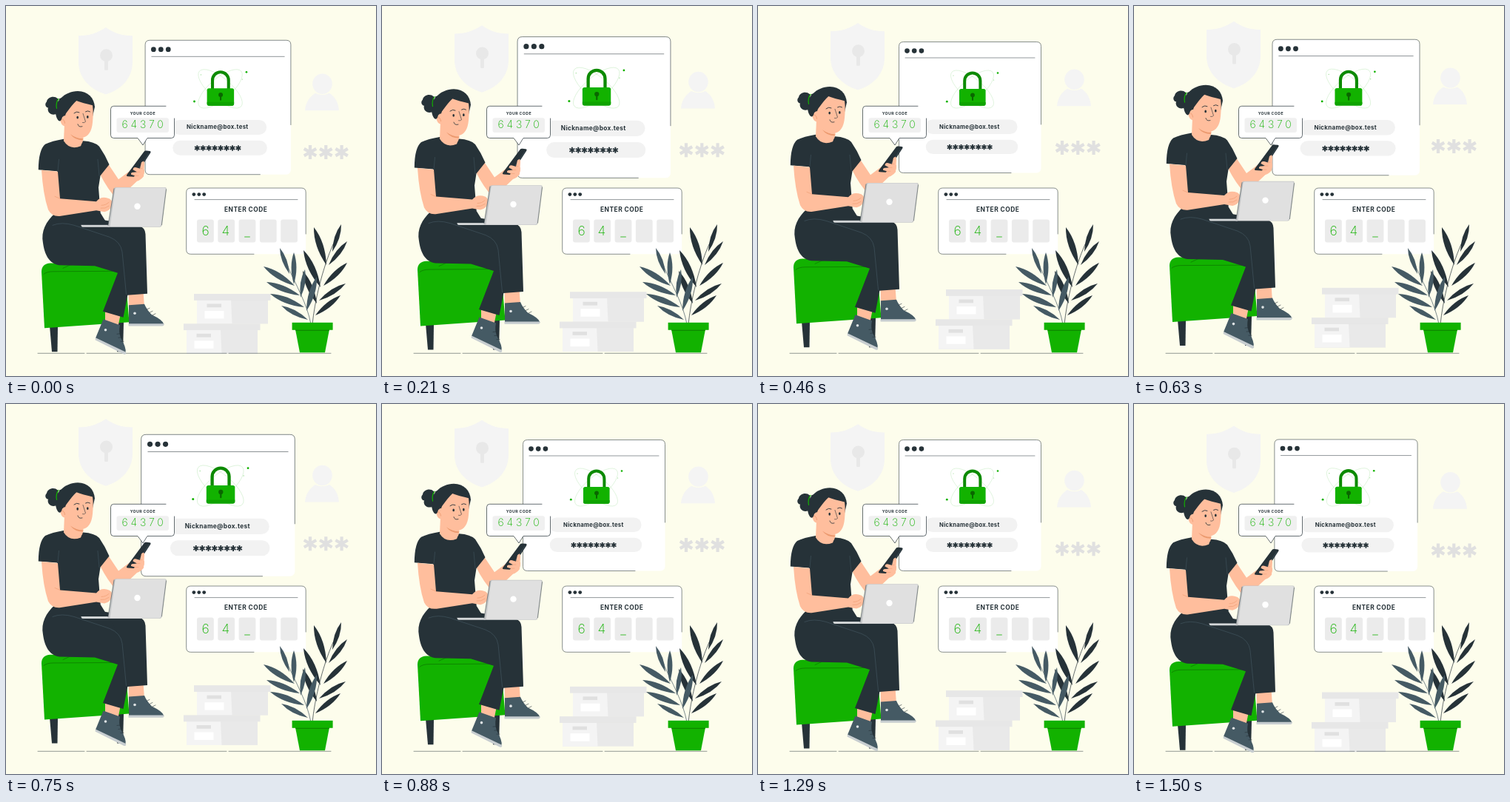
An HTML page for the animation above (1540 ms loop, 500 px wide and 500 px high).

```html
<!DOCTYPE html>
<html lang="en">
<head>
<meta charset="utf-8">
<title>Two-step sign in</title>
<style>
html, body { margin: 0; width: 100%; height: 100%; overflow: hidden; background: #fdfdec; }
svg { display: block; width: 100vw; height: 100vh; }
text { font-family: Inter, "Open Sans", sans-serif; text-anchor: middle; }
</style>
</head>
<body>
<svg id="stage" viewBox="0 0 500 500"></svg>
<script>
const LOOP = 1540, LEAD = 53, LIFT = 10;
const INK = '#263238', SLATE = '#455a64', GREEN = '#12b200', DEEP = '#0c8a00';
const SKIN = '#ffbe9d', SHADE = '#eb996e';

const path = (d, fill) => `<path d="${d}" fill="${fill}"/>`;
const line = (d, color, w = 1) =>
  `<path d="${d}" fill="none" stroke="${color}" stroke-width="${w}" stroke-linecap="round" stroke-linejoin="round"/>`;
const rect = (x, y, w, h, fill, r = 0) =>
  `<rect x="${x}" y="${y}" width="${w}" height="${h}" rx="${r}" fill="${fill}"/>`;
const dot = (x, y, r, fill, ry = r) => `<ellipse cx="${x}" cy="${y}" rx="${r}" ry="${ry}" fill="${fill}"/>`;
const label = (x, y, size, weight, fill, str, gap = 0) =>
  `<text x="${x}" y="${y}" font-size="${size}" font-weight="${weight}" fill="${fill}" letter-spacing="${gap}">${str}</text>`;
const group = (id, ...parts) => `<g id="${id}">${parts.join('')}</g>`;
const repeat = (n, fn) => Array.from({ length: n }, (_, i) => fn(i)).join('');

// Six-armed asterisk
function star(x, y, r, w, color) {
  const d = repeat(3, i => {
    const a = Math.PI / 2 + i * Math.PI / 3, c = r * Math.cos(a), s = r * Math.sin(a);
    return `M${x - c} ${y - s}L${x + c} ${y + s}`;
  });
  return `<path d="${d}" stroke="${color}" stroke-width="${w}"/>`;
}

// White panel whose outline is left open at the lower right corner
function panel(x, y, w, h, r, endX, endY) {
  const R = x + w, B = y + h;
  return rect(x, y, w, h, '#fff', r) + line(
    `M${endX} ${B}H${x + r}Q${x} ${B} ${x} ${B - r}V${y + r}Q${x} ${y} ${x + r} ${y}` +
    `H${R - r}Q${R} ${y} ${R} ${y + r}V${endY}`, INK, 0.55);
}

function leaf(x0, y0, x1, y1, color, w = 0.16) {
  const mx = x0 * 0.45 + x1 * 0.55, my = y0 * 0.45 + y1 * 0.55;
  const nx = (y1 - y0) * w, ny = (x0 - x1) * w;
  return path(`M${x0} ${y0}Q${mx + nx} ${my + ny} ${x1} ${y1}Q${mx - nx} ${my - ny} ${x0} ${y0}Z`, color);
}

function shield() {
  return path('M135 29.7C124 37 112 41 98 41V76C98 98 113 113 135 120.3C157 113 171 98 171 76V41C157 41 145 37 135 29.7Z', '#f4f4f4') +
    dot(135.5, 67.5, 8.5, '#e8e8e8') + rect(133, 72, 5, 15.5, '#e8e8e8', 1.5);
}

function account() {
  return dot(427.5, 106, 13.3, '#f4f4f4', 13.7) +
    path('M404 142C405 130 411 123 418 118.5Q427.5 123 437 118.5C444 123 449 130 450 142Z', '#f4f4f4');
}

function box(x, y) {
  return rect(x + 4, y + 8, 96, 32.5, '#e9e9e9') +
    path(`M${x + 4} ${y + 8}h46l1.5 32.5h-47.5Z`, '#f4f4f4') +
    rect(x, y, 103.5, 8.8, '#e7e7e7') +
    rect(x + 17.5, y + 13.5, 19.5, 4.8, '#e0e0e0') + rect(x + 14.5, y + 23, 26, 10.5, '#fff');
}

function lock() {
  const orbit = a =>
    `<ellipse cx="289.5" cy="112.5" rx="36" ry="14" transform="rotate(${a} 289.5 112.5)" fill="none" stroke="#b7e6b2" stroke-width=".4"/>`;
  return orbit(40) + orbit(-40) +
    line('M279.2 114V101A10.6 10.6 0 0 1 300.4 101V114', DEEP, 4) +
    rect(272, 112, 35.6, 22.7, GREEN, 2.5) +
    path('M272 130V132Q272 134.7 274.5 134.7H305Q307.6 134.7 307.6 132V130Z', '#0fa300') +
    dot(290, 120.3, 2.9, '#0a6600') + rect(289, 121, 2, 7, '#0a6600', 1) +
    dot(324, 90.5, 1.3, GREEN) + dot(255.3, 129.2, 1.4, GREEN) +
    dot(318.5, 100, 0.6, '#8fd988') + dot(264, 94, 0.6, '#8fd988');
}

function login() {
  return panel(190.5, 48.5, 192, 177, 6, 342, 160) +
    repeat(3, i => dot(201.5 + i * 9.7, 60.6, 3.3, INK)) +
    line('M199 70H374', INK, 0.5) + lock() +
    rect(226, 153.5, 124.5, 19.6, '#f2f2f2', 9.8) +
    label(285.8, 165.6, 7.7, 700, INK, 'Nickname@box.test', 0.3) +
    rect(226.8, 180.7, 124.4, 19.4, '#f2f2f2', 9.7) +
    repeat(8, i => star(259 + i * 7.75, 190.6, 3.7, 1.8, INK));
}

function bubble() {
  return path('M145.5 135.3H223.5Q227.5 135.3 227.5 139.3V174.5Q227.5 178.5 223.5 178.5H191L185 188L178 178.5H145.5Q141.5 178.5 141.5 174.5V139.3Q141.5 135.3 145.5 135.3Z', '#fff') +
    line('M216 135.3H145.5Q141.5 135.3 141.5 139.3V174.5Q141.5 178.5 145.5 178.5H178L185 188L191 178.5H223.5Q227.5 178.5 227.5 174.5V152', INK, 0.7) +
    label(184.8, 146.8, 5.2, 700, INK, 'YOUR CODE', 0.4) +
    rect(149.5, 151.3, 70.5, 19.8, '#f0f0f0', 3) +
    label(186.6, 165.3, 14, 200, GREEN, '64370', 3.8);
}

function entry() {
  return panel(243.7, 246, 161.5, 89.3, 6, 335, 308) +
    repeat(3, i => dot(253.9 + i * 6.9, 254.6, 2.4, INK)) +
    line('M255 261.6H394', INK, 0.5) +
    label(324.2, 278.4, 8.4, 700, INK, 'ENTER CODE', 0.5) +
    repeat(5, i => rect(258 + i * 28.3, 288.5, 22.8, 31, '#ebebeb', 3)) +
    label(269.7, 310, 17.6, 200, GREEN, '6') + label(297, 310, 17.6, 200, GREEN, '4') +
    line('M322.6 312H329.4', GREEN, 0.8);
}

function plant() {
  const right = [
    [441, 332, 453, 295], [433, 350, 416, 299], [425, 380, 402, 330], [420, 402, 401, 358],
    [436, 350, 461, 318], [429, 378, 461, 347], [423, 398, 459, 375], [418, 418, 452, 391]];
  const left = [
    [383, 362, 370, 327], [390, 378, 348, 352], [397, 391, 352, 373], [403, 407, 357, 389],
    [408, 424, 372, 405], [389, 376, 389, 333], [398, 394, 404, 356], [406, 412, 420, 366]];
  return line('M414 430C417 400 427 356 442 322', INK, 0.7) +
    right.map(p => leaf(...p, INK)).join('') +
    line('M412 430C407 402 392 378 379 348', SLATE, 0.7) +
    left.map(p => leaf(...p, SLATE)).join('') +
    path('M391 437H437L431 468.3H397Z', GREEN) +
    path('M391 437H437L436.7 438.8H391.4Z', '#0b7a00') +
    rect(386.6, 427.8, 55, 10, GREEN);
}

function stool() {
  return path('M59 433H70L69.5 468H62Z', INK) + path('M149 428H159L158 468H150Z', INK) +
    path('M48 360Q48 349 60 348.3L160 349L166.5 428L52 436Z', GREEN) +
    line('M51 363Q55 359.5 64 359.5L150 359', '#0a5a00', 0.5) +
    line('M77 355Q86 349.5 96 349', '#0a5a00', 0.5);
}

function legs() {
  return path('M165.5 386H185.5L187 408H166Z', SKIN) +
    path('M134 410L155 416L151 436L134 429Z', SKIN) +
    // rear shoe
    path('M166 405L187 403.5Q190 411 197 418Q212 425 213.5 431L166 431Z', SLATE) +
    path('M165.5 430H213.5Q214 433.3 211 433.3H165.5Z', '#c7cdd0') +
    dot(174, 416, 1.8, '#dfe4e6') + line('M190 411L194 409M194 415L198 413M198 418.5L202 416.5', INK, 0.6) +
    // rear leg, then front leg with hips
    path('M120 288L180 298Q188 300 188.5 309L191 389.5L164 391.5L150 330Z', INK) +
    path('M66 281C54 292 47 305 50 321C52 336 58 349 72 351L120 352L151 361.5L131 413.5L158.5 421.5L165 388L161 350Q160 330 154 323L128 281Z', INK) +
    line('M63 297Q75 292 92 297L140 313Q155 319 157 333L162.5 390', SLATE, 0.6) +
    // front shoe
    path('M131.5 424L154 432Q152 441 155 449Q163 463 161.5 469L121 449.5Z', SLATE) +
    path('M121 449L162 468.5Q163 472.3 159 471.3L120.5 452Z', '#c7cdd0') +
    dot(134.5, 438.5, 1.8, '#dfe4e6') + line('M150 444L154 443.5M152 449L156 448.5M155 454L159 454', INK, 0.6);
}

function head() {
  return path('M70 126C65 121 56 124 55 130C51 134 55 139 57 138C55 144 61 149 67 147L72 136Z', INK) +
    // neck
    path('M79 160L78 183Q86 196 101 190L104.5 181L104 170Z', SKIN) +
    path('M87 174Q95 180 104 180L103.6 182Q93 182 87 174Z', SHADE) +
    path('M68 148C64 130 79 116 97 115.7C111 116 119 125 120 137L117 150L80 158Z', INK) +
    path('M93 128C87 134 82 141 80 149C74 148 72 154 74.5 159C76 163 80 164 82 163C85 171 93 178.5 103 178.5C111 178 116 170 117 158C117.8 150 118 142 117 135C110 133 100 131 93 128Z', SKIN) +
    path('M67 146C69 157 74 160 76 151C81 148 85 138 96 128L92 119L72 126Z', INK) +
    line('M71 126Q67 131 68.5 139', GREEN, 1.2) +
    line('M76 154Q79 154 79.5 159', SHADE, 0.8) +
    dot(96.7, 151.3, 1.3, INK, 1.9) + dot(110.3, 150.6, 1.3, INK, 1.9) +
    line('M92 145.5Q95.5 142.5 99 144.5M107.5 143.5Q110.5 141.5 113.5 143.5', INK, 0.9) +
    line('M104 146L107.5 157Q106 159 103.5 158.3', INK, 0.6) +
    line('M97 160.5Q98 165 103 163.5', INK, 0.8);
}

function torso() {
  return path('M127 228L138 214L152 235L168 223Q177 219 186 229L168 246L150 262Q137 248 127 228Z', SKIN) +
    path('M78 180.5Q88 192 104 183Q120 184 126 190.5Q134 202 139.5 215L127.5 230L125 246L128 284H64L69 224L43.8 222Q44 195 53 187.5Q62 183 78 180.5Z', INK) +
    path('M78 179Q84 193 103 186L104.3 180Z', SKIN) +
    path('M48 222.5L70 224.5L73 261L122 265Q128 258 136 260Q145 262 143 269Q142 277 133 279L122 277L74 284.5Q62 286 57 276Q50 255 48 222.5Z', SKIN) +
    line('M73 261L66 258M129 270Q135 270 139 266M128 274Q134 275 139 271', SHADE, 0.6) +
    line('M70 224L71.500 208M126 230L124 208', SLATE, 0.5);
}

function phone() {
  return path('M168 226Q172 216 180 217L187 222Q188 232 178 236L168 238Z', SKIN) +
    path('M186.5 197.5Q187.5 196 190 196.3L194 196.700Q196.500 197 195 199.500L175 230Q174 231.600 172 231.500L164.500 231Q162 230.500 163.500 228.500Z', INK) +
    line('M193 200L174 229', SLATE, 0.6) +
    path('M183 212Q187 208 187 214L186 231Q181 238 172 238L167 235Q172 234 174 230L169 228.500Q168.500 225 172.500 225.500L177 225L171.500 222Q172 218 176 219L181 220.500Z', SKIN) +
    line('M174 230L179 230M177 225L181 225M181 220.500L184 220', SHADE, 0.5);
}

function laptop() {
  return path('M101.5 296.5H140V299.5H104Q101.5 299.5 101.5 296.5Z', '#d5d8d9') +
    line('M102 296.3H138', INK, 0.4) +
    path('M149 245.7H214.5Q217 245.7 216.7 248L210.5 297Q210 299.5 207.5 299.5H137.5L145.5 248Q146 245.7 149 245.7Z', '#c4c6c7') +
    path('M150 246.3H214Q216 246.3 215.7 248.3L209.5 296.5Q209 299 206.5 299H140.5L147.5 248.5Q147.8 246.3 150 246.3Z', '#e0e0e0') +
    line('M146 247.5L138 297M216.6 248.5L210.5 296.5', INK, 0.5) +
    dot(177.5, 271.5, 4.2, '#fff');
}

const stage = document.getElementById('stage');
stage.innerHTML =
  group('back', shield(), account(), repeat(3, i => star(411 + i * 21.3, 198.3, 9.5, 4.2, '#e0e0e0')),
    box(254, 389.7), box(240, 430)) +
  line('M43 469.3H106M109 469.3H298M301 469.3H439', INK, 0.5) +
  group('login', login()) + bubble() + entry() + plant() +
  group('woman', stool(), legs(), torso(), head(), phone(), laptop());

const floats = ['back', 'woman'].map(id => document.getElementById(id));
const card = document.getElementById('login');

// Linear rise and fall between start and end, in ms
const pulse = (t, start, peak, end) =>
  Math.max(0, Math.min((t - start) / (peak - start), (end - t) / (end - peak)));

function draw(now) {
  const t = (now + LEAD) % LOOP;
  const y = -LIFT * pulse(t, 0, LOOP / 2, LOOP);
  floats.forEach(g => g.setAttribute('transform', `translate(0 ${y})`));
  const s = 1 + 0.1 * (pulse(t, 0, 216, 431) + pulse(t, 630, 777, 924));
  card.setAttribute('transform', `translate(286.5 137) scale(${s}) translate(-286.5 -137)`);
}

function tick() {
  draw(performance.now());
  requestAnimationFrame(tick);
}
tick();
</script>
</body>
</html>
```
